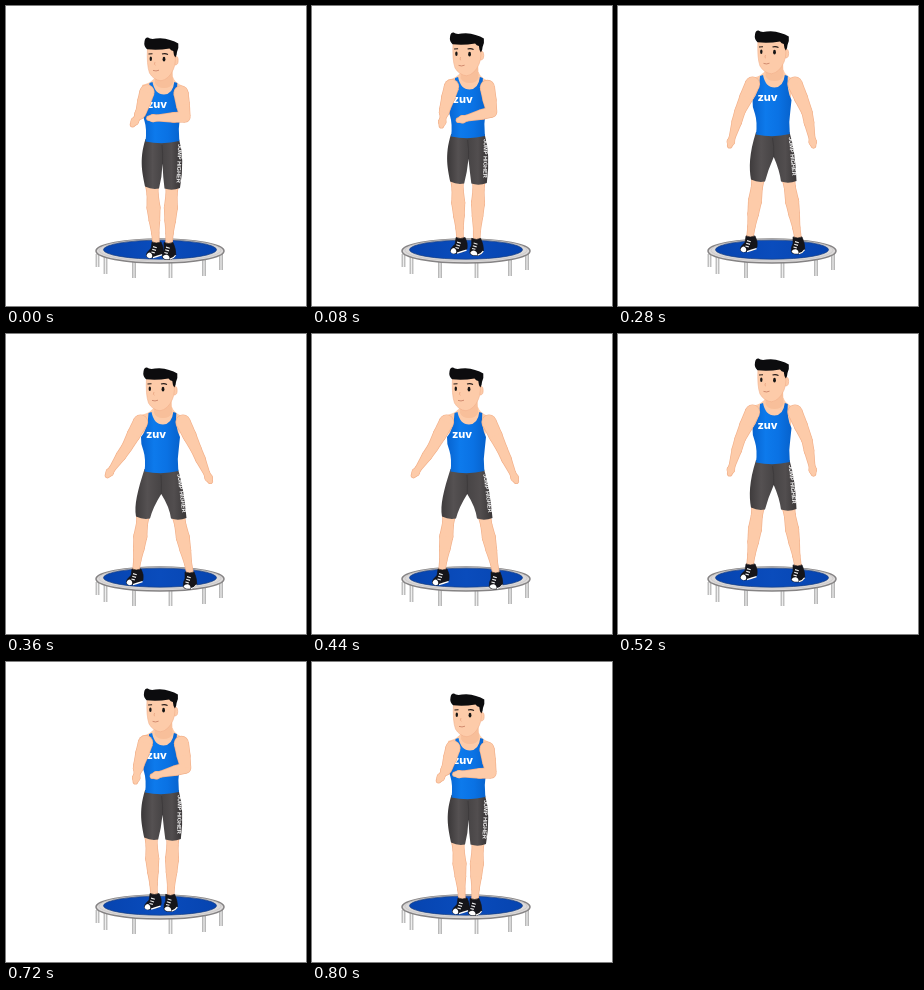
Recreate the animation shown at these times as an HTML page with a canvas. Size 300 px wide and 300 px high, loop 0.84 s.

```html
<!DOCTYPE html>
<html lang="en">
<head>
<meta charset="utf-8">
<title>Trampoline jump</title>
<style>
html, body { margin: 0; width: 100%; height: 100%; overflow: hidden; background: #fff; }
canvas { display: block; width: 300px; height: 300px; }
</style>
</head>
<body>
<canvas id="stage" width="300" height="300"></canvas>
<script>
const g = document.getElementById('stage').getContext('2d');
const STEP = 40, STEPS = 21, HALF = 10;
const SKIN = '#fdcba9', SHADE = '#f2b18b';

// Height of the hair top at each step, from feet together to wide landing
const TOP = [31, 29.5, 26, 22, 19, 18, 20, 24, 28.5, 33, 35];

// Key poses along the eased stride; y is measured from the hair top
const ease = p => (1 - Math.cos(Math.PI * p / HALF)) / 2;
const AT = [0, 4, 7, 9].map(ease);
const POSES = [
  { dx: 0, ls: [141, 55], le: [135, 75], lh: [131, 81], rs: [175, 56], re: [179, 80], rh: [151, 81],
    hem: [146, 166], la: [150, 206], ra: [163, 206.5] },
  { dx: -1.5, ls: [135.5, 54], le: [127.5, 80], lh: [131, 99], rs: [176.5, 54], re: [181.5, 80], rh: [163, 100],
    hem: [143, 169], la: [143, 208], ra: [169, 210] },
  { dx: -1.5, ls: [134.5, 54], le: [122, 81], lh: [114, 108], rs: [177, 54], re: [189, 82], rh: [194, 108],
    hem: [140, 170.5], la: [132, 207], ra: [180, 208] },
  { dx: -1, ls: [134.5, 55], le: [121, 80], lh: [106, 102], rs: [177, 55], re: [190, 82], rh: [201, 107],
    hem: [137, 172.5], la: [130, 203], ra: [184, 206] }
];

const mix = (a, b, t) => Array.isArray(a) ? a.map((v, i) => mix(v, b[i], t)) : a + (b - a) * t;

function poseAt(p) {
  const s = ease(p);
  let i = 0;
  while (i < AT.length - 2 && s > AT[i + 1]) i++;
  const t = (s - AT[i]) / (AT[i + 1] - AT[i]);
  const out = {};
  for (const key in POSES[i]) out[key] = mix(POSES[i][key], POSES[i + 1][key], t);
  return out;
}

function shape(d, fill, stroke, width = 1) {
  const path = new Path2D(d);
  if (fill) { g.fillStyle = fill; g.fill(path); }
  if (stroke) { g.strokeStyle = stroke; g.lineWidth = width; g.stroke(path); }
}

function oval(x, y, rx, ry, fill, stroke, width = 1) {
  g.beginPath();
  g.ellipse(x, y, rx, ry, 0, 0, Math.PI * 2);
  if (fill) { g.fillStyle = fill; g.fill(); }
  if (stroke) { g.strokeStyle = stroke; g.lineWidth = width; g.stroke(); }
}

function across(x0, x1, ...colors) {
  const grad = g.createLinearGradient(x0, 0, x1, 0);
  colors.forEach((c, i) => grad.addColorStop(i / (colors.length - 1), c));
  return grad;
}

// Tapered limb through points [x, y, radius], with a thin shaded edge
function limb(...pts) {
  for (const [color, inset] of [[SHADE, 0], [SKIN, 0.7]]) {
    pts.forEach(([x, y, r], i) => {
      oval(x, y, r - inset, r - inset, color);
      if (!i) return;
      const [px, py, pr] = pts[i - 1];
      const len = Math.hypot(x - px, y - py) || 1;
      const nx = (y - py) / len, ny = (px - x) / len;
      const a = pr - inset, b = r - inset;
      g.beginPath();
      g.moveTo(px + nx * a, py + ny * a);
      g.lineTo(x + nx * b, y + ny * b);
      g.lineTo(x - nx * b, y - ny * b);
      g.lineTo(px - nx * a, py - ny * a);
      g.fillStyle = color;
      g.fill();
    });
  }
}

function trampoline() {
  for (const [x, y, h] of [[91.5, 248, 13], [99.5, 250, 18], [128, 254, 18], [164.5, 254, 18], [198, 252, 18], [215, 247, 17]]) {
    g.fillStyle = across(x - 1.8, x + 1.8, '#999', '#eee', '#999');
    g.fillRect(x - 1.8, y, 3.6, h);
  }
  oval(154, 245, 64, 12, '#dcdada', '#858384', 1.5);
  oval(154, 244.2, 61, 10.8, null, '#c9c7c7', 0.8);
  oval(154, 243.7, 56.5, 9.5, across(97, 211, '#0644b0', '#0a4cbc', '#0644b0'), '#1b3f80', 0.7);
}

function leg(hem, ankle) {
  const knee = [hem, 149];
  const at = (t, r) => [...mix(knee, ankle, t), r];
  limb(at(0, 6.6), at(0.15, 6), at(0.38, 7), at(0.6, 5.8), at(0.82, 4.1), at(1, 3.7));
}

function shoe([x, y], left) {
  g.save();
  g.translate(x, y);
  g.scale(1, 1.12);
  if (left) {
    shape('M-4 -1Q0 1 5 -1Q8 4 7 9Q4 13 -1 12Q-6 15 -9.5 12Q-10.5 9 -5 5Z', '#15151a', '#15151a', 0.6);
    shape('M-9.5 11.7Q-9 8.7 -6 8.5Q-3 10 -4 13Q-8 14.5 -9.5 11.7Z', '#fff');
    shape('M-3 13Q1 12 6.5 10.4', null, '#fff', 1.2);
  } else {
    shape('M-5 -1Q0 1 4 -1Q7 5 6.8 10Q5 14 0 14.3Q-6 14.5 -6.7 12Q-7 8 -5 5Z', '#15151a', '#15151a', 0.6);
    shape('M-6.4 11.8Q-5 9.6 -2 10Q1 11 0.5 14Q-5 14.8 -6.4 11.8Z', '#fff');
    shape('M1 13.9Q5 13 6.6 10.5', null, '#fff', 1.2);
  }
  shape('M-3 3.2L0.8 4.2M-3.8 5.6L0 6.6M-4.6 8L-1.2 8.8', null, '#eee', 1);
  g.restore();
}

function shorts(dx, [l, r]) {
  const w = 139.5 + dx, e = 173 + dx, mid = (l + r) / 2;
  shape(`M${w} 102L${e} 102Q${e + 6} 122 ${r + 8} 151Q${r} 154 ${r - 7.5} 151.5
    Q${r - 9} 140 ${mid + 0.5} 127Q${l + 10} 140 ${l + 7} 151.5Q${l} 153 ${l - 7} 149.5
    C${l - 9} 138 ${w - 7} 124 ${w} 102Z`, across(l - 9, r + 9, '#3d3a3b', '#555152', '#474445', '#524e4f', '#383536'));
  shape(`M${mid + 0.5} 127Q${mid + 1} 116 ${156 + dx} 108`, null, '#3a3738', 0.7);
  g.save();
  g.translate(e + 0.8, 107);
  g.rotate(Math.atan2(43, r + 5 - e));
  g.fillStyle = '#fff';
  g.font = 'bold 5.6px Arial, "Liberation Sans", sans-serif';
  g.textAlign = 'left';
  g.textBaseline = 'middle';
  g.fillText('JUMP HIGHER', 0, 0);
  g.restore();
}

function torso() {
  shape('M149 40Q147 45 136 48L138 70L174 70L177 49Q169 46 167 40Z', SKIN);
  shape('M143.5 46L146.5 45Q149 57.5 158 57.5Q167 57 168.3 45L171.3 46Q170 60 175 70Q173.5 84 172.8 92L173.3 104Q157 108 139.5 104.5Q141 92 138.5 84Q135.5 77 136 70Q143 62 143.5 46Z',
    across(136, 175, '#0763cf', '#0d7aec', '#0a72e4', '#0762cc'));
  g.fillStyle = '#fff';
  g.font = '800 11px Inter, Roboto, sans-serif';
  g.textAlign = 'center';
  g.textBaseline = 'middle';
  g.fillText('zuv', 151, 67.5);
}

function head() {
  shape('M149.5 36L166.5 32L167 46Q165 51 158 51Q151 51 149 46Z', '#f8bf9a');
  oval(169.5, 23.5, 2.6, 4.4, SKIN, SHADE, 0.7);
  shape('M141.5 10L168 11Q171 24 167.5 32Q163 42.5 155 43.8Q147.5 43 143.5 36Q140.5 28 141.5 10Z', SKIN, SHADE, 0.6);
  shape('M141 12.3Q137.5 9 138.5 4.5Q139 .2 142 .5Q144.5 2.6 150 1.5Q158 .6 164 3Q169 4 172.3 6.5Q173 11 171 15Q170.8 19 169.3 20.5Q167.5 18 167.3 14Q165 13.5 163.5 11.5Q152 13.5 141 12.3Z', '#0c0c0e');
  oval(144.8, 21.8, 1.2, 2.3, '#141414');
  oval(158, 22.2, 1.4, 2.4, '#141414');
  shape('M142.5 17L146.5 16.8M156 17Q159 16 162 17.4', null, '#241a17', 1.1);
  shape('M149 25Q147.5 28 149.5 28.2', null, '#e9a582', 0.8);
  shape('M147 33.4Q150 34.6 153 33.2', null, '#c67a60', 0.8);
}

function arm(shoulder, elbow, wrist) {
  const len = Math.hypot(wrist[0] - elbow[0], wrist[1] - elbow[1]) || 1;
  const past = d => mix(elbow, wrist, 1 + d / len);
  limb([...shoulder, 7.6], [...mix(shoulder, elbow, 0.5), 7], [...elbow, 5.6],
    [...mix(elbow, wrist, 0.4), 5.3], [...wrist, 3.4], [...past(4), 4.2], [...past(8), 2.8]);
}

function draw(p) {
  const q = poseAt(p);
  const shifted = fn => { g.save(); g.translate(q.dx, 0); fn(); g.restore(); };
  g.fillStyle = '#fff';
  g.fillRect(0, 0, 300, 300);
  trampoline();
  g.save();
  g.translate(0, TOP[p]);
  leg(q.hem[0], q.la);
  leg(q.hem[1], q.ra);
  shoe(q.la, true);
  shoe(q.ra, false);
  shorts(q.dx, q.hem);
  shifted(torso);
  arm(q.ls, q.le, q.lh);
  arm(q.rs, q.re, q.rh);
  shifted(head);
  g.restore();
}

const start = performance.now();
function tick() {
  const k = Math.floor((performance.now() - start) / STEP) % STEPS;
  draw(k <= HALF ? k : 2 * HALF - k);
  requestAnimationFrame(tick);
}
tick();
</script>
</body>
</html>
```
